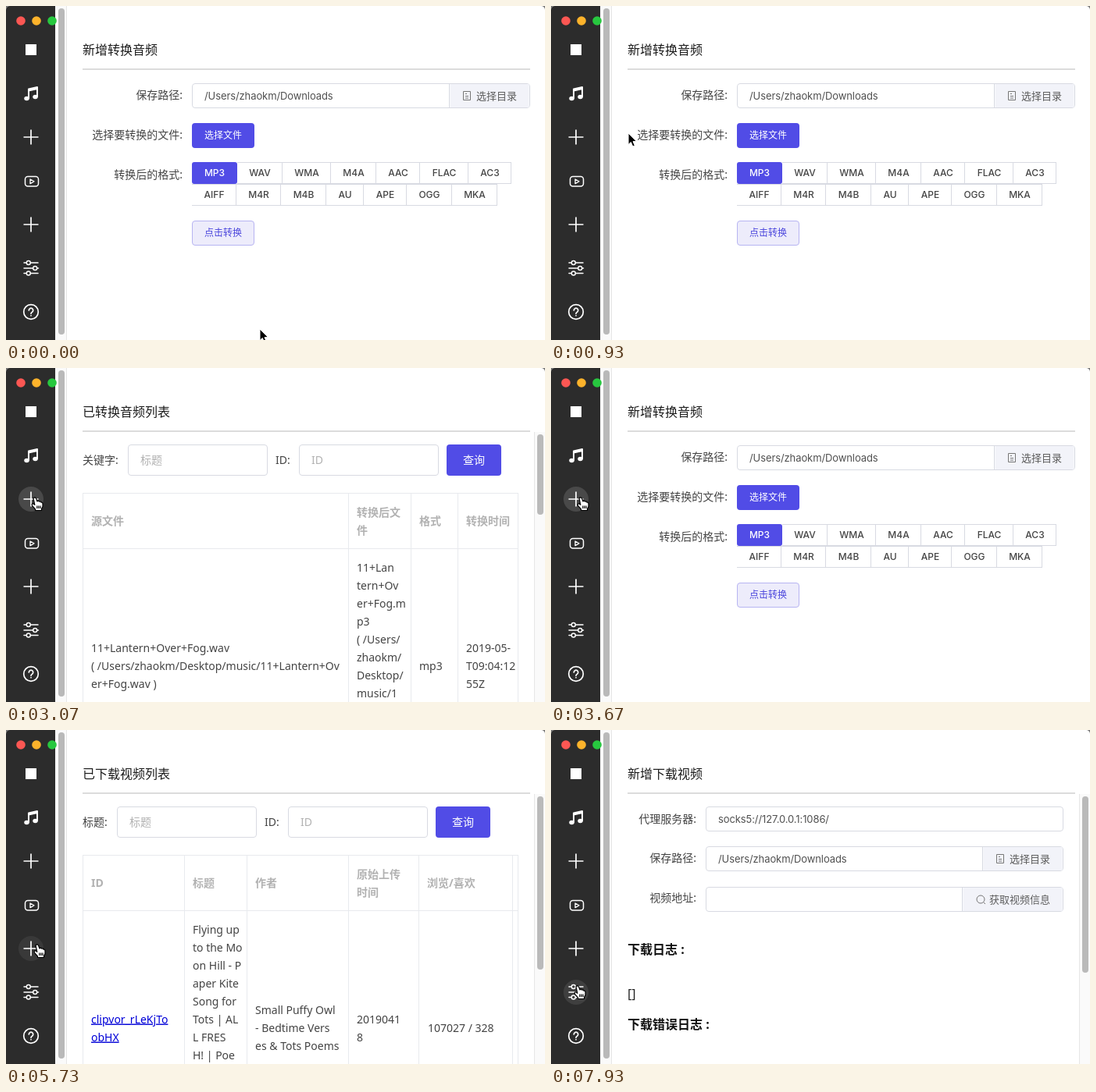
These frames come from a looping animation (690x428 px, 8000 ms). An HTML page:

```html
<!DOCTYPE html>
<html lang="zh-CN">
<head>
<meta charset="utf-8">
<title>Media converter</title>
<style>
html, body { margin: 0; width: 100%; height: 100%; overflow: hidden; background: #777; }
svg { display: block; }
text { font: 14px "Noto Sans", "Noto Sans CJK SC", sans-serif; fill: #444; white-space: pre; }
.ui { font-family: Inter, "Noto Sans CJK SC", sans-serif; }
.icon { fill: none; stroke: #fff; stroke-width: 1.7; stroke-linecap: round; stroke-linejoin: round; }
</style>
</head>
<body>
<svg id="stage" width="690" height="428" viewBox="0 0 690 428"></svg>
<script>
const PURPLE = '#514ce6', LINE = '#d8dae2', GRID = '#e8eaee', PALE = '#b2b2b2';

const rect = (x, y, w, h, fill, extra = '') =>
  `<rect x="${x}" y="${y}" width="${w}" height="${h}" fill="${fill}" ${extra}/>`;
const box = (x, y, w, h, fill = '#fff', stroke = LINE) =>
  rect(x + .5, y + .5, w - 1, h - 1, fill, `stroke="${stroke}" rx="3.5"`);
const hLine = (x, y, w, color = GRID) => rect(x, y, w, 1, color);
const vLine = (x, y, h, color = GRID) => rect(x, y, 1, h, color);

// y is the vertical middle of the line of text
function text(x, y, s, { size = 14, fill = '#444', anchor = 'start', weight = 400, ui, extra = '' } = {}) {
  const safe = s.replace(/&/g, '&amp;');
  return `<text x="${x}" y="${y + size * .36}" text-anchor="${anchor}" ${ui ? 'class="ui"' : ''} ` +
    `style="font-size:${size}px;font-weight:${weight};fill:${fill};${extra}">${safe}</text>`;
}
const lines = (x, y, list, opt) => list.map((s, i) => text(x, y + i * 23, s, opt)).join('');
const label = (x, y, s) => text(x, y, s, { anchor: 'end' });
const value = (x, y, s) => text(x, y, s, { size: 13, ui: true, fill: '#505050', extra: 'letter-spacing:-.1px' });
const heading = s => text(98, 56, s, { size: 16, fill: '#1c1c1c' }) + rect(98, 80, 573, 2, '#dcdcdc');

const button = (x, y, w, h, s, size, weight = 500) =>
  rect(x, y, w, h, PURPLE, 'rx="4"') +
  text(x + w / 2, y + h / 2, s, { size, weight, fill: '#fff', anchor: 'middle' });

const docIcon = (x, y) =>
  `<path d="M${x + .5} ${y - 5.5}h9v11h-9zM${x + 3} ${y - 2.5}h2M${x + 3} ${y + .5}h4M${x + 3} ${y + 3}h4" fill="none" stroke="#777"/>`;
const lensIcon = (x, y) =>
  `<circle cx="${x + 6}" cy="${y}" r="5" fill="none" stroke="#777"/><path d="M${x + 9.5} ${y + 3.5}l2.5 2.5" stroke="#777"/>`;

// Input with an attached button on its right side
const inputGroup = (x, y, right, split, s, caption, icon) =>
  box(x, y, right - x, 32) +
  rect(split + .5, y + 1, right - split - 2, 30, '#f2f3f9') + vLine(split - 1, y, 32, LINE) +
  value(x + 16, y + 16, s) + icon(split + 17, y + 16) +
  text(split + 34, y + 16, caption, { size: 13, fill: '#5c5c5c' });

const scrollbar = end =>
  rect(676, 82, 14, 346, '#fafafa') + vLine(676, 82, 346, '#e6e6e6') +
  rect(680, 85, 8, end - 85, '#bababa', 'rx="4"');

const searchField = (x, s) => box(x, 98, 179, 40) + text(x + 16, 118, s, { fill: PALE });

function formatRow(names, widths, y, active) {
  let x = 238, out = '';
  names.forEach((s, i) => {
    const w = widths[i];
    out += active && !i ? rect(x, y, w, 28, PURPLE, 'rx="3"') : vLine(x + w - 1, y, 28, LINE);
    out += text(x + w / 2, y + 14, s, { size: 12, weight: 500, ui: true, anchor: 'middle', fill: active && !i ? '#fff' : '#444' });
    x += w;
  });
  const start = active ? 238 + widths[0] : 238;
  return hLine(start, y, x - start, LINE) + hLine(start, y + 27, x - start, LINE) + out;
}

const table = columns =>
  hLine(98, 160, 558) + hLine(98, 231, 558) + columns.map(x => vLine(x, 160, 268)).join('');
const head = (x, ...rows) => lines(x, 196 - (rows.length - 1) * 11.5, rows, { fill: PALE, weight: 600 });
const cell = (x, ...rows) => lines(x, 382 - (rows.length - 1) * 11.5, rows);

const addAudio = heading('新增转换音频') +
  label(226, 114, '保存路径:') +
  inputGroup(238, 99, 671, 568, '/Users/zhaokm/Downloads', '选择目录', docIcon) +
  label(226, 165, '选择要转换的文件:') + button(238, 150, 80, 32, '选择文件', 12) +
  label(226, 216, '转换后的格式:') +
  formatRow(['AIFF', 'M4R', 'M4B', 'AU', 'APE', 'OGG', 'MKA'], [57, 57, 58, 48, 55, 58, 58], 228) +
  formatRow(['MP3', 'WAV', 'WMA', 'M4A', 'AAC', 'FLAC', 'AC3'], [58, 58, 62, 58, 56, 62, 55], 200, true) +
  box(238, 275, 80, 32, '#edecfb', '#b7b4f2') +
  text(278, 291, '点击转换', { size: 12, fill: '#4a45dc', anchor: 'middle', weight: 500 });

const audioList = heading('已转换音频列表') +
  text(98, 118, '关键字:') + searchField(156, '标题') +
  text(345, 118, 'ID:') + searchField(375, 'ID') + button(564, 98, 70, 40, '查询', 14) +
  table([98, 438, 518, 578]) +
  head(109, '源文件') + head(449, '转换后文', '件') + head(529, '格式') + head(589, '转换时间') +
  cell(109, '11+Lantern+Over+Fog.wav', '( /Users/zhaokm/Desktop/music/11+Lantern+Ov', 'er+Fog.wav )') +
  lines(449, 256, ['11+Lan', 'tern+Ov', 'er+Fog.m', 'p3', '( /Users/', 'zhaokm/', 'Desktop/', 'music/1']) +
  cell(529, 'mp3') + cell(589, '2019-05-', 'T09:04:12', '55Z') +
  rect(656, 160, 20, 268, '#fff') + vLine(655, 160, 268) + scrollbar(188);

const videoList = heading('已下载视频列表') +
  text(98, 118, '标题:') + searchField(142, '标题') +
  text(331, 118, 'ID:') + searchField(361, 'ID') + button(550, 98, 70, 40, '查询', 14) +
  table([98, 228, 308, 438, 528, 648, 655]) +
  head(109, 'ID') + head(239, '标题') + head(319, '作者') + head(449, '原始上传', '时间') + head(539, '浏览/喜欢') +
  lines(109, 370.5, ['clipvor_rLeKjTo', 'obHX'], { fill: '#0000d8', extra: 'text-decoration:underline' }) +
  lines(239, 256, ['Flying up', 'to the Mo', 'on Hill - P', 'aper Kite', 'Song for', 'Tots | AL', 'L FRES', 'H! | Poe']) +
  cell(319, 'Small Puffy Owl', '- Bedtime Vers', 'es & Tots Poems') +
  cell(449, '2019041', '8') + cell(540, '107027 / 328') + scrollbar(307);

const log = (y, s) =>
  text(98, y, s, { size: 16, weight: 700, fill: '#111' }) + text(98, y + 57, '[]', { size: 16, fill: '#222' });

const addVideo = heading('新增下载视频') +
  label(186, 114, '代理服务器:') + box(198, 98, 458, 32) + value(214, 114, 'socks5://127.0.0.1:1086/') +
  label(186, 164, '保存路径:') +
  inputGroup(198, 149, 656, 553, '/Users/zhaokm/Downloads', '选择目录', docIcon) +
  label(186, 215, '视频地址:') +
  inputGroup(198, 201, 656, 527, '', '获取视频信息', lensIcon) +
  log(281, '下载日志 :') + log(377, '下载错误日志 :') + scrollbar(311);

const iconRows = [112, 168, 224, 280, 336, 392];
const plus = y => `<path d="M22.500 ${y}h19M32 ${y - 9.5}v19" stroke-linecap="butt"/>`;
const icons = `<g class="icon">
  <path d="M29 118V106.500L40 104V116M29 108.500L40 106" stroke-width="2"/>
  <ellipse cx="26.500" cy="118.500" rx="2.400" ry="1.900" fill="#fff"/><ellipse cx="37.500" cy="116.500" rx="2.400" ry="1.900" fill="#fff"/>
  ${plus(168)}${plus(280)}
  <rect x="24.500" y="218.500" width="17" height="12.500" rx="3.500" stroke-width="1.500"/>
  <path d="M31 222l5 2.800-5 2.800z" stroke-width="1.300"/>
  <path d="M23 329h3M31.500 329H41M23 336h11.500M40 336h1.500M23 342.500h3M31.500 342.500H41" stroke-width="1.500"/>
  <circle cx="28.800" cy="329" r="2.500" stroke-width="1.400"/><circle cx="37.200" cy="336" r="2.500" stroke-width="1.400"/><circle cx="28.800" cy="342.500" r="2.500" stroke-width="1.400"/>
  <circle cx="32" cy="392" r="9.300"/>
  <path d="M29.300 390a2.700 2.700 0 1 1 4.200 2.200q-1.500 .8-1.500 2M32 396.500v.2"/>
</g>`;

const stage = document.getElementById('stage');
stage.innerHTML = '<clipPath id="win"><rect width="690" height="434" rx="5"/></clipPath><g clip-path="url(#win)">' +
  rect(0, 0, 690, 428, '#fff') +
  [addAudio, audioList, videoList, addVideo].map(p => `<g class="page">${p}</g>`).join('') +
  rect(0, 0, 63, 428, '#2c2c2c') + rect(63, 0, 15, 428, '#fafafa') + vLine(77, 0, 428, '#e6e6e6') +
  rect(67, 3, 8, 418, '#b9b9b9', 'rx="4"') +
  ['#fc5753', '#fdb32b', '#27c83f'].map((c, i) => `<circle cx="${19 + 20 * i}" cy="19" r="5.800" fill="${c}"/>`).join('') +
  rect(25, 49, 14, 14, '#fff') +
  iconRows.map(y => `<circle class="hover" cx="32" cy="${y}" r="16" fill="#494949"/>`).join('') + icons + '</g>' +
  `<path id="arrow" d="M0 0V14.500L3.300 11.500L5.700 17L8.300 15.900L6 10.600H10.500Z" stroke="#fff" stroke-linejoin="round"/>
  <path id="hand" d="M-3 0Q-1-2.300 .6 .2L2 4Q3.500 2.300 4.600 4.200Q6.200 3 7 5.200Q8.800 4.600 9 7V10.500L7.500 13.500V15.500H-.5V13.800L-4.500 9.300Q-5.600 6.600-3 7L-1.200 8.300Z
    M1.800 9.500v3.500M3.900 9.500v3.500M6 9.500v3.500" fill="#fff" stroke="#000" stroke-width="1.200" stroke-linejoin="round"/>`;

const pages = [...stage.querySelectorAll('.page')], hovers = [...stage.querySelectorAll('.hover')];
const arrow = document.getElementById('arrow'), hand = document.getElementById('hand');

const schedule = [[0, 0], [1870, 1], [3270, 0], [5070, 2], [6730, 3]];
const track = [
  [0, 325, 414], [70, 318, 406], [730, 122, 161], [930, 99, 163], [1330, 38, 114], [1470, 37, 114],
  [1950, 37, 114], [2670, 38, 166], [3270, 38, 167], [4000, 39, 167], [4400, 41, 220],
  [5080, 41, 220], [5710, 41, 276], [7530, 41, 276], [7790, 35, 329], [8000, 35, 329]
];

function cursorAt(t) {
  const i = Math.max(1, track.findIndex(k => k[0] >= t));
  const [t0, x0, y0] = track[i - 1], [t1, x1, y1] = track[i];
  const f = Math.max(0, (t - t0) / (t1 - t0));
  return [x0 + (x1 - x0) * f, y0 + (y1 - y0) * f];
}
function iconAt(t) {
  const [x, y] = cursorAt(t);
  return iconRows.findIndex(cy => Math.hypot(x - 32, y - cy) < 16);
}

function draw(t) {
  const page = schedule.filter(s => s[0] <= t).pop()[1];
  pages.forEach((p, i) => p.setAttribute('visibility', i === page ? 'visible' : 'hidden'));

  // Hover fades over 300 ms: the share of that window spent on each icon
  const share = iconRows.map(() => 0);
  for (let i = 0; i < 15; i++) {
    const hit = iconAt(Math.max(0, t - i * 20));
    if (hit >= 0) share[hit] += 1 / 15;
  }
  hovers.forEach((h, i) => h.setAttribute('opacity', share[i]));

  const over = iconAt(t) >= 0;
  const [x, y] = cursorAt(t).map(Math.round);
  for (const c of [arrow, hand]) {
    c.setAttribute('transform', `translate(${x} ${y})`);
    c.setAttribute('visibility', (c === hand) === over ? 'visible' : 'hidden');
  }
}

function tick() {
  draw(performance.now() % 8000);
  requestAnimationFrame(tick);
}
tick();
</script>
</body>
</html>
```
